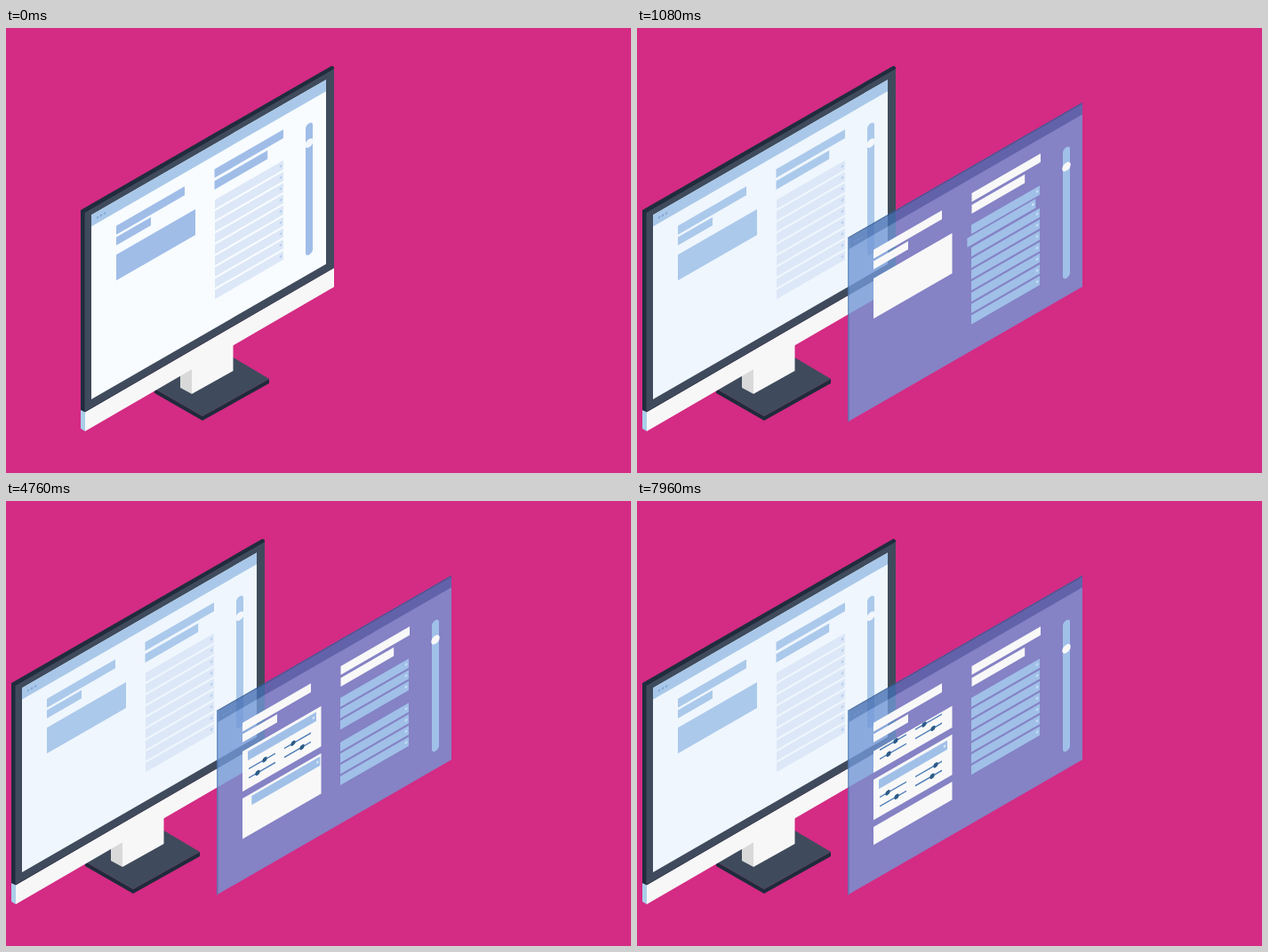
Write an HTML page that moves like this. It is 703 px wide and 501 px high and loops after 8000 ms.

```html
<!DOCTYPE html>
<html lang="en">
<head>
<meta charset="utf-8">
<title>Interface layers</title>
<style>
  html, body { margin: 0; width: 100%; height: 100%; overflow: hidden; background: #d42b84; }
  svg { display: block; width: 100%; height: 100%; }
</style>
</head>
<body>
<svg id="stage" viewBox="0 0 703 501"></svg>
<script>
const NS = 'http://www.w3.org/2000/svg';
const LOOP = 8000;
const ISO = -0.577;
const ROW = { x: 138, y: 64, w: 77, h: 10.2, pitch: 12.7, count: 9 };
const CARD = { x: 28, y: 60.4, w: 88.5, h: 45.5, pitch: 53.2 };
const stage = document.getElementById('stage');

function add(parent, tag, attrs = {}) {
  const el = document.createElementNS(NS, tag);
  for (const key in attrs) el.setAttribute(key, attrs[key]);
  parent.appendChild(el);
  return el;
}
const group = parent => add(parent, 'g');
const rect = (p, x, y, width, height, fill, rx = 0) =>
  add(p, 'rect', { x, y, width, height, fill, rx });
const dot = (p, cx, cy, r, fill) => add(p, 'circle', { cx, cy, r, fill });
const poly = (p, points, fill) => add(p, 'polygon', { points, fill });
const move = (el, x, y) => el.setAttribute('transform', `translate(${x} ${y})`);
const iso = (el, x, y) => el.setAttribute('transform', `matrix(1 ${ISO} 0 1 ${x} ${y})`);

const clamp = v => Math.max(0, Math.min(1, v));
const lerp = (a, b, p) => a + (b - a) * p;
const mix = (a, b, p) => `rgb(${a.map((v, i) => Math.round(lerp(v, b[i], p)))})`;
const linear = (t, start, length) => clamp((t - start) / length);
function ease(t, start, length) {
  const p = linear(t, start, length);
  return p * p * (3 - 2 * p);
}

function headings(p, fill) {
  rect(p, 28, 28.4, 77, 10, fill);
  rect(p, 28, 41.2, 39, 9.2, fill);
  rect(p, 138.5, 28.4, 77.5, 9.8, fill);
  rect(p, 138.5, 41.7, 59.7, 9.6, fill);
}

function listRow(p, fill, dotFill) {
  const g = group(p);
  rect(g, 0, 0, ROW.w, ROW.h, fill);
  dot(g, 74, 4.8, 1.3, dotFill);
  return g;
}

function windowDots(p, fill) {
  for (let i = 0; i < 3; i++) dot(p, 7 + 4 * i, 6.8, 1.2, fill);
}

// Monitor
const monitor = group(stage);
poly(monitor, '89,406 143,437 218,395 218,400 143,442 89,411', '#1f2b3b');
poly(monitor, '89,406 143,437 218,395 164,363', '#3f4b5c');
poly(monitor, '118,385 131,378 131,412 118,405', '#d9d9d9');
poly(monitor, '131,376 177.500,350 177.500,386 131,412', '#f7f7f7');
poly(monitor, '6,430 11,432 11,454 6,451', '#a9cfea');
poly(monitor, '11,432 291,270 291,291.500 11,454', '#f7f7f7');
poly(monitor, '6,205 288.500,42.500 291,44 291,270 11,432.500 6,430', '#202c3d');
poly(monitor, '10.500,208 291,46 291,270 10.500,432', '#3f4b5c');

const screen = group(monitor);
iso(screen, 18, 210.5);
const glass = rect(screen, 0, 0, 264, 207.5, '#f8fcff');
rect(screen, 0, 0, 264, 13, '#a9c8e9');
windowDots(screen, '#7fa5d4');
const blocks = group(screen);
headings(blocks, 'inherit');
rect(blocks, 28, 61, 89, 29, 'inherit');
rect(blocks, 241, 38, 8, 148, 'inherit', 4);
dot(screen, 245, 60.5, 4.6, '#f3f6fa');
for (let i = 0; i < ROW.count; i++)
  move(listRow(screen, '#dce7f7', '#b5cdec'), ROW.x + 1, ROW.y - 0.8 + i * ROW.pitch);

// Floating layer
const panel = group(stage);
const sheet = group(panel);
sheet.setAttribute('opacity', 0.8);
rect(sheet, -1, -2, 264, 207.5, '#7298d6');
rect(sheet, -1, -0.7, 264, 12.3, '#4670b4');
rect(sheet, -1, -2, 264, 1.5, '#2c548c');
rect(sheet, -1, -2, 1.6, 207.5, '#4f7cbb');
windowDots(panel, '#6f93cb');
headings(panel, '#f8f8f8');
rect(panel, 241, 38, 8, 147.5, '#a0c0e8', 4);
const thumb = dot(panel, 245, 0, 4.7, '#f8f8f8');
const list = group(panel);

const clip = add(add(stage, 'defs'), 'clipPath', { id: 'view' });
rect(clip, 10, CARD.y, 220, 105.6, '#000');
const view = group(panel);
view.setAttribute('clip-path', 'url(#view)');
const scroller = group(view);
const backs = [0, 1, 2].map(i =>
  rect(scroller, CARD.x, CARD.y + i * CARD.pitch, CARD.w, CARD.h, '#f8f8f8'));

const rows = Array.from({ length: ROW.count }, () => listRow(list, '#a0c0e8', '#cddff4'));

// Each slider lists its moves as [start, length, from, to].
const cards = [
  { start: 1040, slot: 1, sliders: [
    [1900, 620, 15, 18], [2740, 400, 15, 10], [2940, 400, 15, 10], [3140, 380, 15, 20]] },
  { start: 4360, slot: 3, sliders: [
    [6060, 420, 15, 9], [6440, 440, 15, 19], [5220, 540, 15, 23], [6900, 420, 14.5, 19]] }
];
cards.forEach((card, i) => {
  const top = CARD.y + i * CARD.pitch;
  card.bar = listRow(scroller, '#a0c0e8', '#dbe8f7');
  card.barY = top + 3.7;
  card.controls = group(scroller);
  card.knobs = card.sliders.map((_, n) => {
    const x = n < 2 ? 35 : 75;
    const y = top + (n % 2 ? 34 : 23.8);
    rect(card.controls, x, y - 0.8, 30, 1.6, '#4d7cb8');
    const knob = group(card.controls);
    dot(knob, x, y, 2.7, '#2b5b88');
    return knob;
  });
});
const free = rows.map((_, i) => i);
cards.forEach(card => { card.row = free.splice(card.slot, 1)[0]; });

function render(t) {
  const out = ease(t, 0, 520);
  const fade = linear(t, 0, 520);
  move(monitor, 78 * (1 - out), 0);
  iso(panel, 238 - 142 * (1 - out), 237.5 - 27 * (1 - out));
  panel.setAttribute('opacity', fade);
  glass.setAttribute('fill', mix([248, 252, 255], [239, 246, 253], clamp(fade * 1.5)));
  blocks.setAttribute('fill', mix([160, 189, 232], [171, 201, 235], fade));

  const scroll = ease(t, 7790, 400);
  move(scroller, 0, -54 * scroll);
  thumb.setAttribute('cy', 60 + 26 * scroll);
  backs[1].setAttribute('height', CARD.h * ease(t, 3790, 400));

  const slots = rows.map((_, i) => i);
  for (const card of cards) {
    const close = ease(t, card.start + 340, 380);
    const go = ease(t, card.start - 20, 480);
    const taken = t >= card.start - 20;
    rows[card.row].style.display = taken ? 'none' : '';
    card.bar.style.display = taken ? '' : 'none';
    move(card.bar, lerp(ROW.x, 34, go), lerp(ROW.y + card.slot * ROW.pitch, card.barY, go));
    for (let i = card.row + 1; i < rows.length; i++) slots[i] -= close;
    card.controls.setAttribute('opacity', linear(t, card.start + 480, 480));
    card.sliders.forEach(([start, length, from, to], n) =>
      move(card.knobs[n], lerp(from, to, ease(t, start, length)), 0));
  }
  rows.forEach((row, i) => move(row, ROW.x, ROW.y + slots[i] * ROW.pitch));
}

const begin = performance.now();
function tick() {
  render((performance.now() - begin) % LOOP);
  requestAnimationFrame(tick);
}
render(0);
requestAnimationFrame(tick);
</script>
</body>
</html>
```
